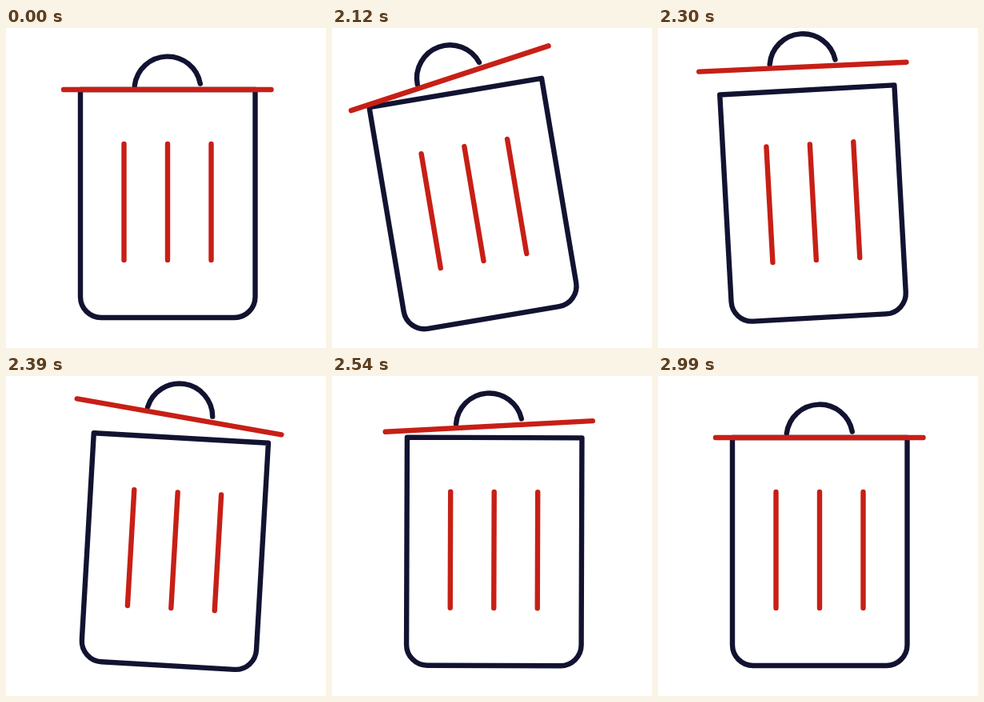
These frames come from a looping animation (400x400 px, 3.02 s). An HTML page:

```html
<!DOCTYPE html>
<html lang="en">
<head>
<meta charset="utf-8">
<title>Trash bin</title>
<style>
  html, body { margin: 0; width: 100%; height: 100%; overflow: hidden; background: #fff; }
  svg { display: block; width: 100%; height: 100%; }
  path { fill: none; stroke-width: 6.4; stroke-linecap: round; stroke-linejoin: round; }
  .navy { stroke: #121331; }
  .red { stroke: #c71f16; }
</style>
</head>
<body>
<svg viewBox="0 0 400 400">
  <g id="bin">
    <path class="navy" d="M93 77V336a26 26 0 0 0 26 26H285.5a26 26 0 0 0 26-26V77Z"/>
    <path class="red" d="M147.5 145V290M202 145V290M256.5 145V290"/>
    <g id="lid">
      <path class="navy" d="M160.8 72A41.5 41.5 0 0 1 242.8 69.6"/>
      <path class="red" d="M72 77H331.5"/>
    </g>
  </g>
</svg>
<script>
const LOOP = 3020, START = 2030, STEP = 30;

const bin = document.getElementById('bin');
const lid = document.getElementById('lid');

function pose(turn, x, y, tilt) {
  bin.setAttribute('transform', `rotate(${turn} 202 365)`);
  lid.setAttribute('transform', `translate(${x} ${y}) rotate(${tilt} 202 77)`);
}

function shake(t) {
  // Eased 0 to 1 between two times
  const ease = (from, to) => {
    const u = Math.min(1, Math.max(0, (t - from) / (to - from)));
    return (1 - Math.cos(Math.PI * u)) / 2;
  };
  const settle = ease(2540, 2960);

  // The bin leans left, swings right, then stands up
  const turn = -10 * ease(1953, 2145) + 14.5 * ease(2170, 2440) - 4.5 * ease(2440, 2555);
  // The lid rocks after it, jumps up and sinks back softly
  const tilt = -8.7 * ease(2015, 2130) + 15.5 * ease(2165, 2405) - 10 * ease(2405, 2540) + 3.2 * settle;
  const x = -3.4 * ease(1970, 2100) - 3.1 * ease(2400, 2540) + 6.5 * settle;
  const y = -30.2 * ease(1970, 2225) / (1 + Math.exp((t - 2530) / 72));
  pose(turn, x, y, tilt);
}

function draw(now) {
  const t = now % LOOP;
  if (t < START) pose(0, 0, 0, 0);
  else shake(t - (t - START) % STEP);
  requestAnimationFrame(draw);
}
draw(performance.now());
</script>
</body>
</html>
```
